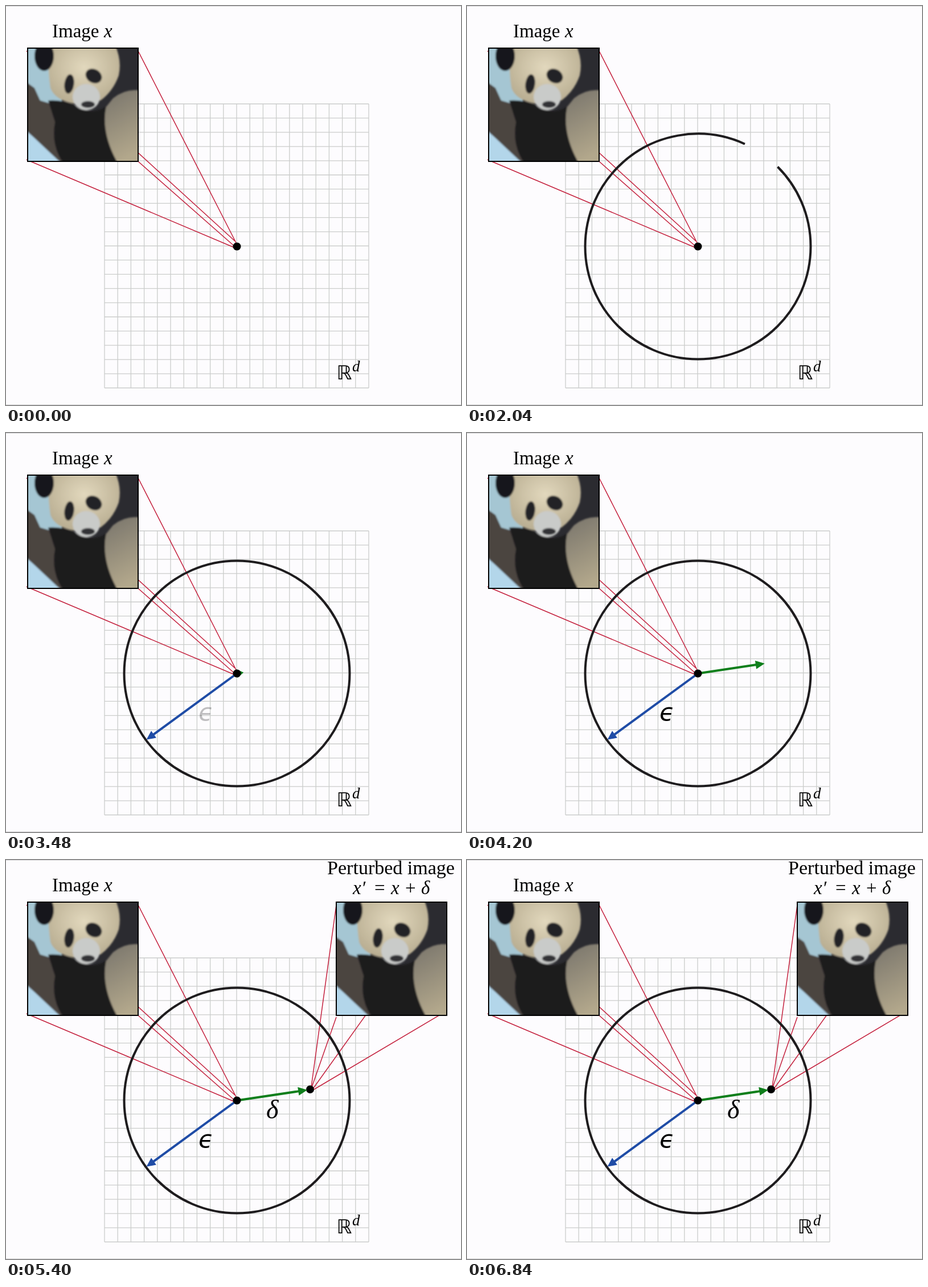
Write an HTML page that moves like this. It is 799 by 701 pixels and loops after 6.88 s.

```html
<!DOCTYPE html>
<html lang="en">
<head>
<meta charset="utf-8">
<title>Perturbation ball</title>
<style>
  html, body { margin: 0; width: 100%; height: 100%; overflow: hidden; background: #fdfcfe; }
  svg { display: block; }
  text { font-family: "Palatino Linotype", Palatino, "Liberation Serif", serif; font-size: 33px; }
  .it { font-style: italic; }
  .sym { font-family: "DejaVu Sans", sans-serif; }
  .rays { fill: none; stroke: #c4213e; stroke-width: 1.5; }
</style>
</head>
<body>
<svg width="799" height="701" viewBox="0 0 799 701">
  <defs>
    <filter id="soft" x="-10%" y="-10%" width="120%" height="120%"><feGaussianBlur stdDeviation="1.8"/></filter>
    <clipPath id="crop"><rect width="194" height="199"/></clipPath>
    <linearGradient id="fur" x1="0" y1="0" x2="0.3" y2="1">
      <stop offset="0" stop-color="#77736a"/><stop offset="1" stop-color="#b3a88c"/>
    </linearGradient>
    <radialGradient id="face" cx="0.5" cy="0.4" r="0.6">
      <stop offset="0" stop-color="#e2d8bd"/><stop offset="1" stop-color="#b9ae92"/>
    </radialGradient>
    <g id="photo">
      <g clip-path="url(#crop)">
        <rect width="194" height="199" fill="#2b2b30"/>
        <g filter="url(#soft)">
          <path d="M-9-9H60V100H-9z" fill="#a5c6d3"/>
          <path d="M-9 55L12 70 22 92 42 98 70 205 40 199-9 150z" fill="#4b4441"/>
          <path d="M-9 139L12 158 62 205H-9z" fill="#b3d6ea"/>
          <path d="M150 88Q175 68 205 76V205H156Q124 165 134 108z" fill="url(#fur)"/>
          <path d="M36 92Q70 90 90 106 120 116 138 102 128 150 160 205H64Q40 170 48 130z" fill="#1e1b1f"/>
          <path d="M38-9H152Q166 20 160 48 150 76 128 92L84 98Q48 92 40 70 34 30 38-9z" fill="url(#face)"/>
          <ellipse cx="29" cy="14" rx="17" ry="26" fill="#19191d"/>
          <ellipse cx="103" cy="86" rx="24" ry="23" fill="#c9cbc9"/>
          <ellipse cx="73" cy="63" rx="8.5" ry="17" transform="rotate(8 73 63)" fill="#202126"/>
          <ellipse cx="116" cy="49" rx="15" ry="12" transform="rotate(30 116 49)" fill="#202126"/>
          <ellipse cx="106" cy="99" rx="12" ry="6" fill="#303136"/>
        </g>
      </g>
      <rect width="194" height="199" fill="none" stroke="#000" stroke-width="2"/>
    </g>
  </defs>

  <path d="M0 .5H799M0 700.5H799" stroke="#d6d6d8"/>
  <path id="grid" stroke="#cbcdcb" stroke-width="1.3"/>
  <text x="594" y="656" class="sym" text-anchor="middle" style="font-size:34px">ℝ</text>
  <text x="608" y="642" class="it" style="font-size:27px">d</text>

  <path class="rays" d="M36 79L402 413M232 79L404 416M36 270L400 424M232 273L400 421"/>
  <use href="#photo" x="38" y="74"/>
  <text x="81" y="55">Image <tspan x="172" class="it">x</tspan></text>

  <g id="result">
    <path class="rays" d="M580 79L536 399M580 276L537 399M773 75L539 402M774 265L541 403"/>
    <use href="#photo" x="580" y="74"/>
    <text x="676" y="25" text-anchor="middle" style="font-size:34px">Perturbed image</text>
    <text y="60"><tspan x="609" class="it">x</tspan><tspan x="626">′</tspan><tspan x="647">=</tspan><tspan
      x="676" class="it">x</tspan><tspan x="701">+</tspan><tspan x="729" class="it">δ</tspan></text>
    <text x="457" y="454" class="it" style="font-size:46px">δ</text>
    <circle cx="534" cy="403" r="7"/>
  </g>

  <circle id="ball" r="198" pathLength="360" transform="translate(405.5 422.5) rotate(-45)"
    fill="none" stroke="#1e1c1e" stroke-width="4"/>
  <path id="blue" transform="translate(405.5 422.5) rotate(143.8)" fill="#1f4ca6"/>
  <path id="green" transform="translate(405.5 422.5) rotate(-8.5)" fill="#0f7f1c"/>
  <text id="eps" x="338" y="505" class="it sym" style="font-size:43px">ϵ</text>
  <circle cx="405.5" cy="422.5" r="7"/>
</svg>
<script>
const LOOP = 6880, STEP = 40;
const $ = id => document.getElementById(id);
const progress = (t, start, span) => Math.min(1, Math.max(0, (t - start) / span));
const ease = u => (1 - Math.cos(Math.PI * u)) / 2;

let lines = '';
for (let i = 0; i <= 20; i++) {
  lines += `M${173 + i * 23.2} 172V671M173 ${172 + i * 24.95}H637`;
}
$('grid').setAttribute('d', lines);

// The arrow grows out of the centre dot, keeping its head size.
function arrow(id, u, length) {
  const tip = 7 + (length - 7) * ease(u), neck = Math.max(0, tip - 16);
  $(id).setAttribute('d', u ? `M0-2H${neck}V-7.5L${tip} 0L${neck} 7.5V2H0z` : '');
}

function draw(t) {
  const sweep = 360 * ease(progress(t, 380, 1960));
  $('ball').style.display = sweep ? '' : 'none';
  $('ball').setAttribute('stroke-dasharray', sweep < 360 ? `${sweep} 400` : 'none');
  arrow('blue', progress(t, 2370, 1000), 197);
  arrow('green', progress(t, 3350, 1000), 125);
  $('eps').style.opacity = progress(t, 3360, 500);
  $('result').style.opacity = progress(t, 4360, 500);
}

const begin = performance.now();
function frame() {
  const t = (performance.now() - begin) % LOOP;
  draw(Math.floor(t / STEP) * STEP);
  requestAnimationFrame(frame);
}
frame();
</script>
</body>
</html>
```
